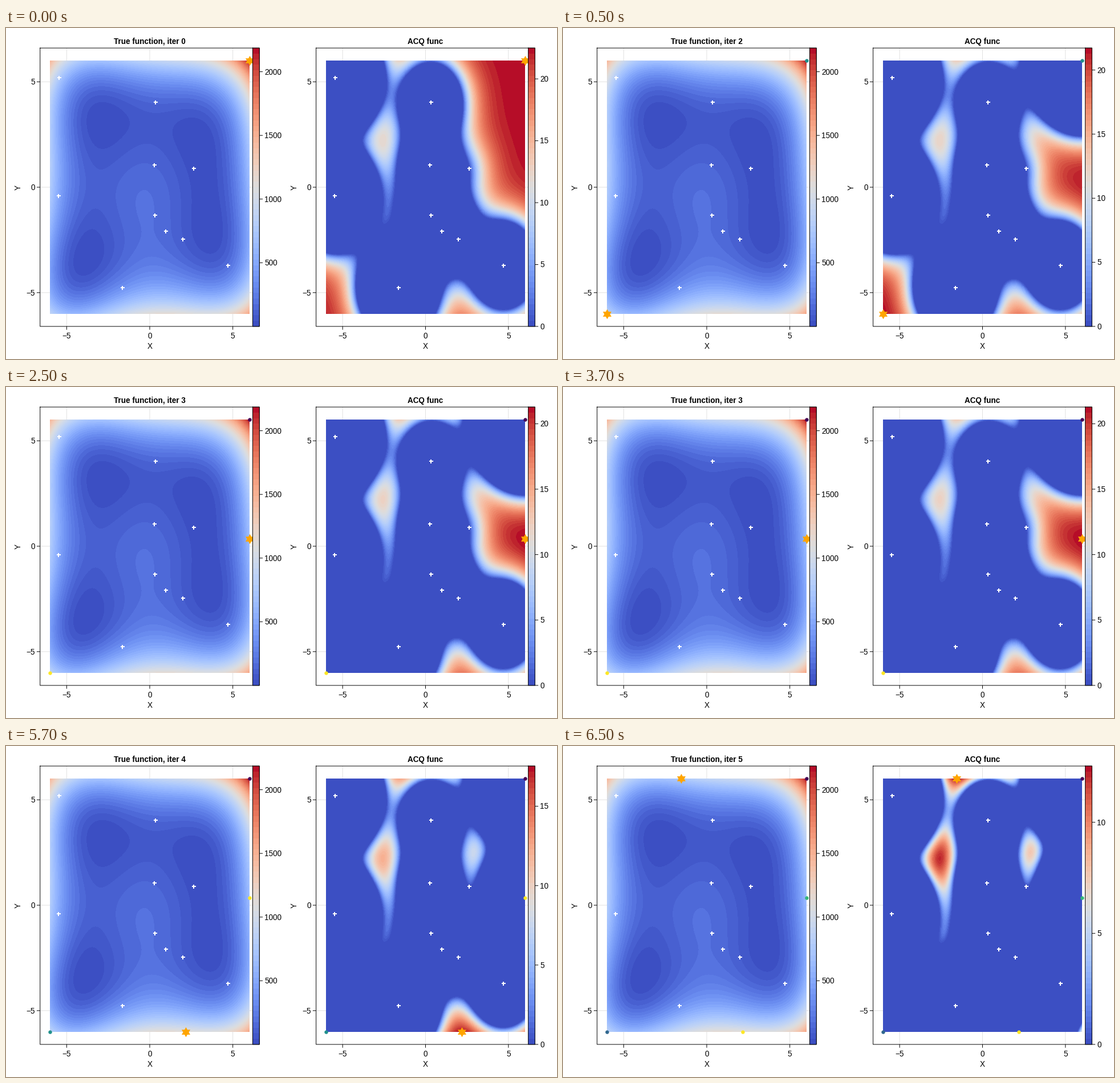
A matplotlib script for the animation above (8 s loop, 966 by 580 pixels).

```python
import math

import matplotlib.pyplot as plt
import numpy as np
from matplotlib.animation import FuncAnimation
from matplotlib.path import Path

W, H, DPI = 966, 580, 100
PX = 72 / DPI
SCALE_Y, MID_Y = 36.95, 279.0
TOP, BOTTOM = 35.1, 522.9
LINE = 0.966 * PX
BANDS = 50
BAR_WIDTH = 11.8

SAMPLES = np.array([
    (-5.469, 5.207), (0.333, 4.042), (0.262, 1.048), (2.643, 0.888),
    (-5.496, -0.411), (0.317, -1.313), (0.968, -2.073), (1.974, -2.452),
    (4.696, -3.710), (-1.643, -4.774)])
QUERIES = np.array([(6, 6), (-6, -6), (6, 0.365), (2.17, -6), (-1.555, 6)])
ITERATIONS = [0, 2, 3, 4, 5]

erf = np.vectorize(math.erf, otypes=[float])
coolwarm, viridis = plt.get_cmap("coolwarm"), plt.get_cmap("viridis")


def objective(x, y):
    return (x**2 + y - 11)**2 + (x + y**2 - 7)**2


def matern52(a, b):
    r2 = ((a[:, None, :] - b[None, :, :])**2).sum(axis=-1)
    s = np.sqrt(5 * r2)
    return (1 + s + s**2 / 3) * np.exp(-s)


def expected_improvement(points, grid):
    """Zero-mean Gaussian process, unit length scale, minimising."""
    values = objective(*points.T)
    gram = matern52(points, points) + 1e-6 * np.eye(len(points))
    cross = matern52(grid, points)
    gain = values.min() - cross @ np.linalg.solve(gram, values)
    variance = 1 - (cross @ np.linalg.inv(gram) * cross).sum(axis=1)
    sigma = np.sqrt(np.maximum(variance, 1e-10))
    z = gain / sigma
    cdf = 0.5 * (1 + erf(z / math.sqrt(2)))
    pdf = np.exp(-z**2 / 2) / math.sqrt(2 * math.pi)
    return np.maximum(gain * cdf + sigma * pdf, 0)


def banded(field):
    t = (field - field.min()) / np.ptp(field)
    band = np.minimum(np.floor(t * BANDS), BANDS - 1)
    return coolwarm((band + 0.5) / BANDS)


def star_path(points=6, inner=0.57):
    angle = np.arange(2 * points + 1) * math.pi / points + math.pi / 2
    radius = np.where(np.arange(2 * points + 1) % 2, inner, 1)
    return Path(np.column_stack([radius * np.cos(angle),
                                 radius * np.sin(angle)]), closed=True)


gx, gy = np.meshgrid(np.linspace(-6, 6, 700), np.linspace(-6, 6, 888))
grid = np.column_stack([gx.ravel(), gy.ravel()])
truth = objective(gx, gy)
truth_image = banded(truth)
acq_images, acq_peaks = [], []
for count in range(len(QUERIES)):
    known = np.vstack([SAMPLES, QUERIES[:count]])
    acq = expected_improvement(known, grid).reshape(gx.shape)
    acq_images.append(banded(acq))
    acq_peaks.append(acq.max())
bar_image = coolwarm((np.arange(BANDS) + 0.5) / BANDS)[:, None, :]
STAR = star_path()

fig = plt.figure(figsize=(W / DPI, H / DPI), dpi=DPI, facecolor="white")
ax = fig.add_axes([0, 0, 1, 1])


def stroke(xs, ys, color="black", z=3):
    ax.plot(xs, ys, color=color, lw=LINE, snap=False, zorder=z,
            solid_capstyle="butt")


def frame(x0, x1, z):
    stroke([x0, x1, x1, x0, x0], [TOP, TOP, BOTTOM, BOTTOM, TOP], z=z)
    ax.lines[-1].set_solid_capstyle("projecting")


def label(x, y, text, ha="center", **style):
    ax.text(x, y, text, ha=ha, va="baseline", fontsize=13.52 * PX,
            family="Liberation Sans", zorder=9, **style)


def picture(image, x0, x1, y0, y1, z):
    ax.imshow(image, extent=(x0, x1, y0, y1), origin="lower", aspect="auto",
              interpolation="nearest", zorder=z)


def colorbar(x1, low, high, ticks):
    x0 = x1 - BAR_WIDTH
    picture(bar_image, x0, x1, BOTTOM, TOP, 7)
    frame(x0, x1, 8)
    for tick in ticks:
        y = BOTTOM - (tick - low) / (high - low) * (BOTTOM - TOP)
        stroke([x1, x1 + 5.8], [y, y], z=8)
        label(x1 + 8.9, y + 4.9, f"{tick}", ha="left")


def panel(cx, sx, title, image, step):
    def to_px(points):
        return cx + sx * points[:, 0], MID_Y - SCALE_Y * points[:, 1]

    x0, x1 = cx - 6.6 * sx, cx + 6.6 * sx
    for tick in (-5, 0, 5):
        x, y = cx + sx * tick, MID_Y - SCALE_Y * tick
        stroke([x, x], [TOP, BOTTOM], color=(0, 0, 0, 0.12), z=1)
        stroke([x0, x1], [y, y], color=(0, 0, 0, 0.12), z=1)
        stroke([x, x], [BOTTOM, BOTTOM + 5.8])
        stroke([x0 - 5.8, x0], [y, y])
        text = str(tick).replace("-", "\u2212")
        label(x, 543.7, text)
        label(x0 - 8.9, y + 4.9, text, ha="right")
    frame(x0, x1, 3)
    picture(image, cx - 6 * sx, cx + 6 * sx,
            MID_Y + 6 * SCALE_Y, MID_Y - 6 * SCALE_Y, 2)

    label(cx, 28, title, weight="bold")
    label(cx, 562.3, "X")
    ax.text(x0 - 37.6, MID_Y, "Y", rotation=90, ha="center", va="center",
            fontsize=13.52 * PX, family="Liberation Sans")

    ax.plot(*to_px(SAMPLES), "P", color="white", ms=7 * PX, mew=0, zorder=4)
    shades = viridis(np.linspace(0, 1, step)) if step > 1 else [viridis(0.5)]
    for point, shade in zip(QUERIES[:step], shades):
        ax.plot(*to_px(point[None]), "o", color=shade, ms=6.4 * PX, mew=0,
                zorder=5)
    # A custom marker is normalised so that its tips reach half its size.
    ax.plot(*to_px(QUERIES[step:step + 1]), marker=STAR, color="orange",
            ms=17.4 * PX, mew=0, zorder=6)
    return x1


def draw(i):
    step = (i + 3) // 4
    ax.clear()
    ax.set_xlim(0, W)
    ax.set_ylim(H, 0)
    ax.axis("off")
    edge = panel(252, 29.13, f"True function, iter {ITERATIONS[step]}",
                 truth_image, step)
    colorbar(edge, truth.min(), truth.max(), range(500, 2001, 500))
    edge = panel(735.5, 29.07, "ACQ func", acq_images[step], step)
    peak = acq_peaks[step]
    colorbar(edge, 0, peak, range(0, int(peak) + 1, 5))
    return []


anim = FuncAnimation(fig, draw, frames=16, interval=500, init_func=lambda: [],
                     repeat=True, repeat_delay=0)
plt.show()
```
